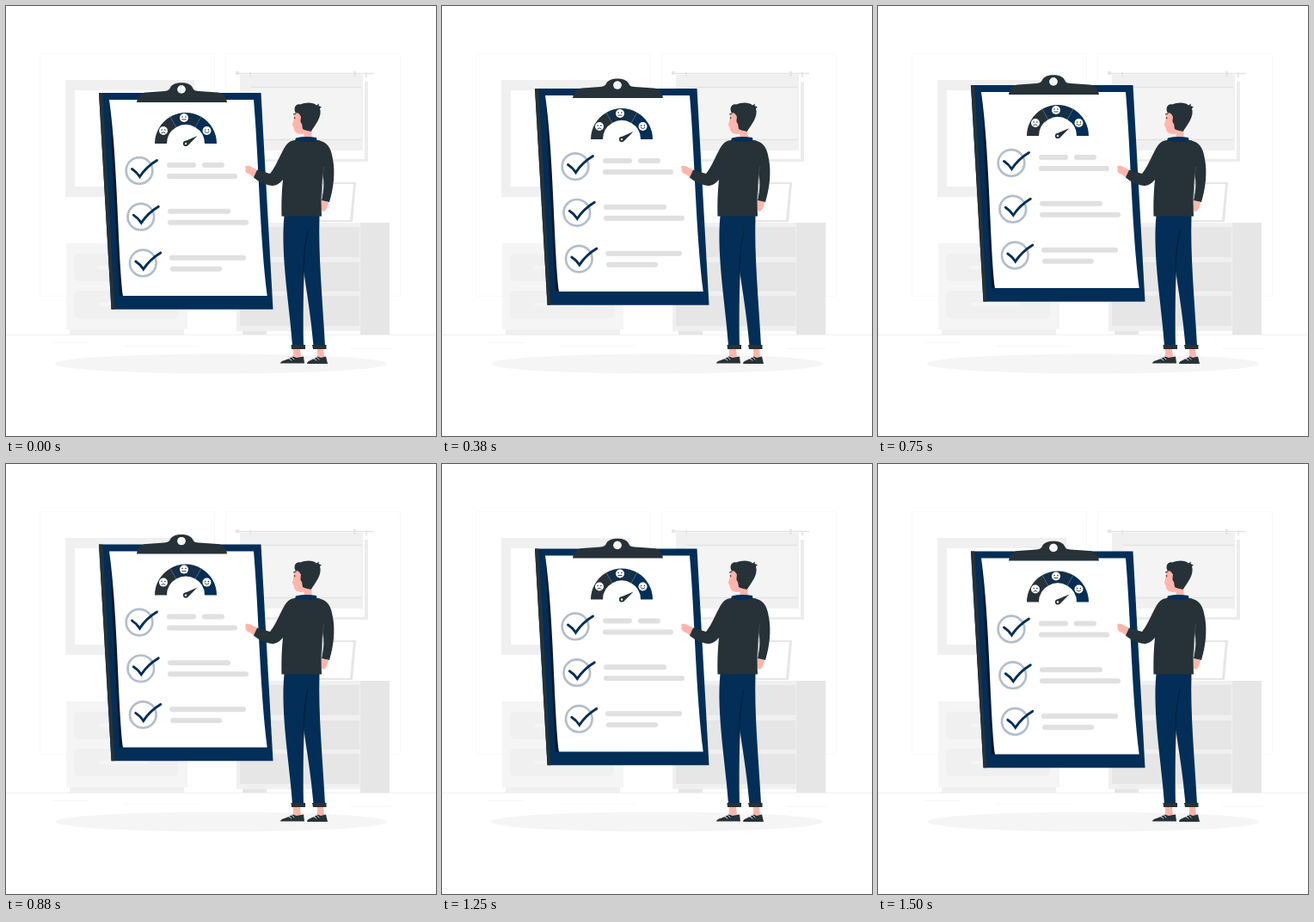
These frames come from a looping animation (500x500 px, 1540 ms). An HTML page:

```html
<!DOCTYPE html>
<html lang="en">
<head>
<meta charset="utf-8">
<title>Checklist</title>
<style>
  html, body { margin: 0; height: 100%; overflow: hidden; background: #fff; }
  svg { display: block; width: 100vw; height: 100vh; }
  .ink { fill: #263238; }
  .navy { fill: #022e57; }
  .skin { fill: #ffb5ab; }
  .g1 { fill: #f5f5f5; }
  .g2 { fill: #f0f0f0; }
  .g3 { fill: #e6e6e6; }
  .line { fill: none; stroke-linecap: round; }
</style>
</head>
<body>
<svg viewBox="0 0 500 500">
  <defs>
    <g id="tick" class="line">
      <circle cx="155" cy="191.5" r="15.3" stroke="#b3becb" stroke-width="2.7"/>
      <path d="M146.5 189.5Q152 193 155.5 198.500Q163 187 175.500 179.500" stroke="#022e57" stroke-width="2.9"/>
    </g>
    <g id="face">
      <circle r="5" fill="#fff"/>
      <circle class="ink" cx="-1.900" cy="-1" r=".8"/>
      <circle class="ink" cx="1.900" cy="-1" r=".8"/>
    </g>
  </defs>

  <!-- Room -->
  <g fill="none" stroke="#f8f8f8">
    <rect x="39.500" y="55.500" width="203" height="282" rx="2"/>
    <rect x="255.500" y="55.500" width="203" height="282" rx="2"/>
    <path d="M0 382.500H500" stroke="#f0f0f0"/>
    <path d="M54 391.500H97M137 395.500H225M400 398.500H447"/>
  </g>
  <path class="g2" fill-rule="evenodd" d="M69 86H219V222H69ZM80 98V210H208V98Z"/>

  <g>
    <path class="g3" d="M274 88H421V181H274Z" opacity=".75"/>
    <path fill="#fff" d="M274 88H417V178H274Z"/>
    <path class="g2" d="M272 80H415V168H272Z"/>
    <path fill="#f4f4f4" d="M285 94H413V155H285Z"/>
    <path d="M268 78.500H427M285 155.500H413M285 94.500H413" fill="none" stroke="#e2e2e2" stroke-width="1.300"/>
    <path class="g3" d="M267 76h4v4h-4ZM404 76h3v6h-3ZM418 77h2v6h-2ZM283 77h2v5h-2Z"/>
  </g>

  <g>
    <path class="g2" d="M74 374H207V382H74ZM197 276H211V376H197Z"/>
    <path class="g1" d="M70 276H197V376H70Z"/>
    <path class="g1" d="M197 276H211V376H197Z"/>
    <rect class="g2" x="79" y="288" width="121" height="32" rx="6"/>
    <rect class="g2" x="79" y="331" width="121" height="32" rx="6"/>
    <path class="g1" d="M108 302H165V306H108ZM108 345H165V349H108Z"/>
  </g>

  <g>
    <path class="g3" d="M365 205H407L403 251H361Z"/>
    <path fill="#fff" d="M367 207H404L400 249H363Z"/>
    <path class="g2" d="M268 252H412V378H268Z"/>
    <path class="g3" d="M412 252H446V382H412ZM272 257H411V292H272ZM272 298H411V332H272ZM272 337H411V372H272ZM275 378H303V382H275Z"/>
  </g>

  <ellipse class="g1" cx="250" cy="416" rx="193" ry="11.500"/>

  <!-- Clipboard -->
  <g id="board">
    <path class="navy" d="M108 101H296.500L310.500 352.700H122.500Z"/>
    <path class="ink" d="M108 101H112.500L126.500 352.700H122.500Z"/>
    <path fill="#01172d" d="M120 109L132 337H137L128 180Z"/>
    <path fill="#fff" d="M120 109H288C294 180 295 268 303.700 337H136C130 290 130 180 120 109Z"/>

    <path class="ink" fill-rule="evenodd" d="M152 112C153 105 157 101 163 100.500L184 99C189 98.500 190 97 191 95C193 91 198 89.300 204 89.300S215 91 217 95C218 97.500 219 98.500 224 99L246 100.500C252 101 256 105 257 112ZM199.300 97a4.700 4.700 0 0 0 9.400 0a4.700 4.700 0 0 0-9.400 0Z"/>
    <circle cx="204" cy="97" r="4.700" fill="#f5f5f5"/>

    <g class="line" stroke-width="14" style="stroke-linecap:butt">
      <path d="M180 160A29 29 0 0 1 194.500 134.900" stroke="#263238"/>
      <path d="M194.500 134.900A29 29 0 0 1 223.500 134.900" stroke="#142f48"/>
      <path d="M223.500 134.900A29 29 0 0 1 238 160" stroke="#022e57"/>
      <path d="M191 128.800L198 141M227 128.800L220 141" stroke="#536577" stroke-width=".6"/>
    </g>
    <use href="#face" x="183" y="145"/>
    <use href="#face" x="207" y="130"/>
    <use href="#face" x="233.500" y="145"/>
    <path d="M180.800 147.800Q183 145.300 185.200 147.800M204.800 132H209.200M231 146Q233.500 149.200 236 146" class="line" stroke="#263238" stroke-width=".9"/>
    <path class="ink" d="M207.300 157.600L222.500 151L211.500 162.200Z"/>
    <circle class="ink" cx="209" cy="160" r="3.100"/>
    <circle cx="209" cy="160" r="1.200" fill="#fff"/>

    <use href="#tick"/>
    <use href="#tick" x="1.800" y="53.700"/>
    <use href="#tick" x="4.300" y="107.500"/>
    <path class="line" stroke="#e0e0e0" stroke-width="6" d="M190 185H218M231 185H251M190 198H266M191 238.700H258M191 251.700H279M193 292.700H276M194 305.700H248"/>
  </g>

  <!-- Man -->
  <g>
    <path class="skin" d="M367 226L375 228C374 234 372 238 369 239L366 237Z"/>
    <path class="skin" d="M334 398H342L343 409H334ZM362 398H369L370 409H362Z"/>
    <path class="ink" d="M319 415.500C319 412 328 412 333 407.500L338 409L346 407.500L347 415.500ZM350 416C350 412 357 412 362 407.500L366 409L372 407.500L374 416Z"/>
    <path class="line" stroke="#fff" stroke-width=".8" d="M332 408L335 411M329 410L332 412M361 408L364 411M358 410L361 412"/>
    <path class="navy" d="M340 244H364.500C363 290 368 340 371 395H357.500C354 355 349 330 345.500 303Z"/>
    <path class="navy" d="M323.500 244H352C347 280 345 330 346 395H333C330 350 319 290 323.500 244Z"/>
    <path d="M351 262C347 280 346 295 345.500 318" class="line" stroke="#011d38"/>
    <path class="ink" d="M331.500 394H348V399H332ZM356 394H372.500V399H357Z"/>

    <path class="skin" d="M292 190.500L284 186.500C279 184.500 277 187 279 189C277 192 280 195 284 196L289 200Z"/>
    <path class="ink" d="M358 156C373 156 378 164 380 178C383 193 381 212 376 228L367 226C370 213 370 203 368 195Z"/>
    <path class="ink" d="M337 156H362C372 157 371 170 370 183C367 205 366 222 367 244.500H320.500C320 226 321 212 322 202C317 208 312 210 306 208.500C299 207 293 204 288 199.500L292 190.500L307 195C314 186 317 177 322 168C326 160 330 156 337 156Z"/>
    <path d="M369.500 187C368 196 368 205 367 222" class="line" stroke="#4a555b" stroke-width=".7"/>
    <path class="skin" d="M338 122C333 127 335.500 132 333.300 136.500C332 139 334.500 139.500 334.800 142C335 148 341 150 346.500 148.500V155H355.500V130Z"/>
    <path class="navy" d="M337 153.500Q348 151 361 153L361.500 157Q348 158.500 336 156.500Z"/>
    <path class="ink" d="M337 124.500C333.500 119 337 113 342 114.500C348 112 357 111.500 361 115.500L364 113.500L363.500 116L367 117.500L365 119C368 128 360 138 354.500 146C351 145 347 144.500 345 143L344 137C340.500 134 344.500 129 342 127C340 124 338.500 124 337 124.500Z"/>
    <path class="line" stroke="#263238" stroke-width="1.100" d="M334.500 126L337 125M335.700 129.500V130.700"/>
  </g>
</svg>
<script>
  const LOOP = 1540, STEPS = 37, FPS = 24, RISE = 10;
  const board = document.getElementById('board');

  // Linear rise and fall, stepped at 24 frames per second.
  function draw(now) {
    const step = Math.min(STEPS - 1, Math.floor((now % LOOP + 5) * FPS / 1000));
    const phase = (step + 1.2) / STEPS % 1;
    const lift = RISE * (1 - Math.abs(1 - 2 * phase));
    board.setAttribute('transform', `translate(0 ${0.6 - lift})`);
    requestAnimationFrame(draw);
  }
  draw(performance.now());
</script>
</body>
</html>
```
